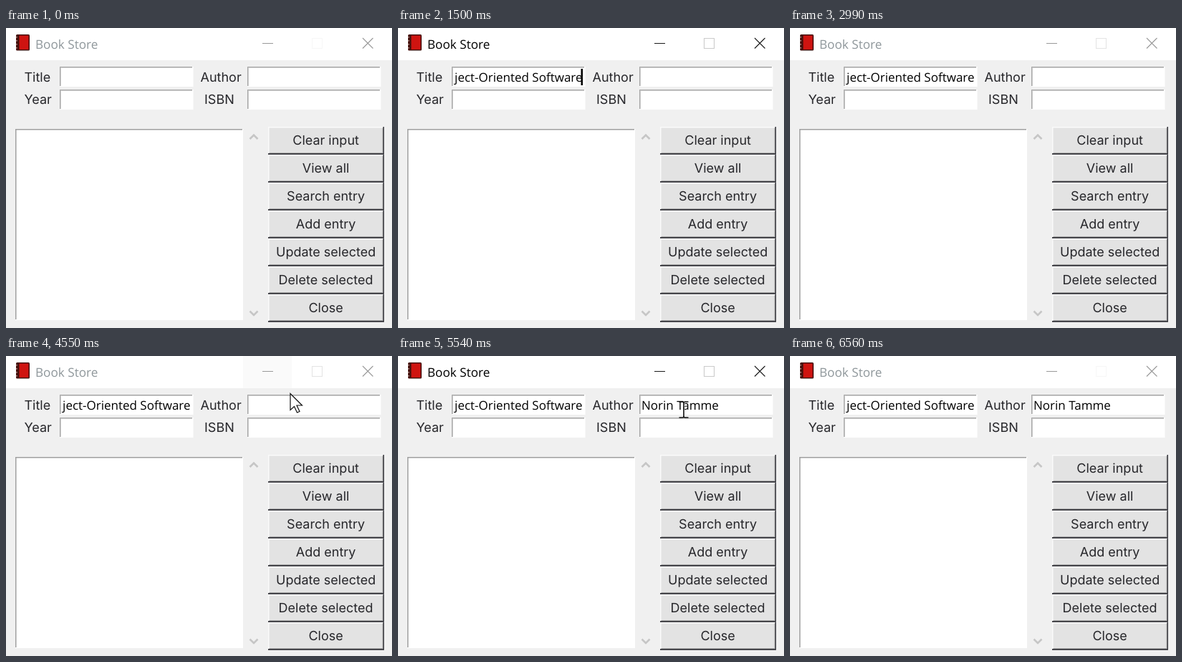
Animation of 539x419 px, one loop 8000 ms. Source, as an HTML page:

```html
<!DOCTYPE html>
<html lang="en">
<head>
<meta charset="utf-8">
<title>Book Store</title>
<style>
  html, body { margin: 0; width: 100%; height: 100%; overflow: hidden; background: #f0f0f0; }
  svg { display: block; width: 539px; height: 419px; }
  text { text-rendering: geometricPrecision; }
  .ui { font: 18px Inter, sans-serif; fill: #26262a; }
  .field { font: 17px "Open Sans", sans-serif; fill: #000; }
  .mid { text-anchor: middle; }
  .line { fill: none; stroke-width: 1.1; }

  .title, .ctl, .max, .caret, .beam1, .beam2, .arrow, .hover, .book, .author {
    animation: 8s step-end infinite;
  }
  .title { animation-name: title; font-size: 17.15px; }
  .ctl { animation-name: ctl; }
  .max { animation-name: max; }
  .caret { animation-name: caret; }
  .book { animation-name: book; }
  .author { animation-name: author; }
  .beam1 { animation-name: beam1; }
  .beam2 { animation-name: beam2; }
  .arrow, .hover { animation-name: arrow; }

  @keyframes title {
    0%, 37.375%, 75.75% { fill: #8f979b; }
    18.75%, 69.25% { fill: #000; }
  }
  @keyframes ctl {
    0%, 37.375%, 75.75% { stroke: #999; }
    18.75%, 69.25% { stroke: #1a1a1a; }
  }
  @keyframes max {
    0%, 82% { stroke: #f7f7f7; }
    18.75%, 69.25% { stroke: #cbcbcb; }
    37.375%, 75.75% { stroke: #e4e4e4; }
  }
  @keyframes book { 0% { opacity: 0; } 18.75% { opacity: 1; } }
  @keyframes caret { 0%, 37.375% { opacity: 0; } 18.75% { opacity: 1; } }
  @keyframes author { 0% { opacity: 0; } 69.25% { opacity: 1; } }
  @keyframes beam1 { 0%, 18.75% { opacity: 0; } 12.5% { opacity: 1; } }
  @keyframes beam2 { 0%, 75.75% { opacity: 0; } 63.125% { opacity: 1; } }
  @keyframes arrow { 0%, 63.125% { opacity: 0; } 56.875% { opacity: 1; } }
</style>
</head>
<body>
<svg viewBox="0 0 539 419">
  <defs>
    <g id="entry">
      <path fill="#fff" d="M0 0h186.500v28H0z"/>
      <path fill="#a6a6a6" d="M0 0h185v1H0zM0 0h1v27H0z"/>
      <path fill="#cecece" d="M1 1h184v1H1zM1 1h1v26H1z"/>
    </g>
    <g id="button">
      <path fill="#e3e3e3" d="M0 0h162v39H0z"/>
      <path fill="#fafafa" d="M0 0h161v1.500H0zM0 0h1.500v37H0z"/>
      <path fill="#aaa" d="M1.500 36h159v1h-159zM159.500 1.500h1v35h-1z"/>
      <path fill="#34343a" d="M0 37h162v1.700H0zM160.500 0h1.500v38.700h-1.500z"/>
    </g>
    <g id="beam">
      <path fill="none" stroke="#fff" stroke-width="3.500" opacity=".6" d="M0 1v22"/>
      <path fill="none" stroke="#111" stroke-width="1.600"
            d="M-6.500 1h4.500q2 0 2 2q0-2 2-2h4.500M0 2v20M-6.500 23h4.500q2 0 2-2q0 2 2 2h4.500"/>
    </g>
    <clipPath id="clip"><path d="M77.500 56h181v25h-181z"/></clipPath>
  </defs>

  <path fill="#f0f0f0" d="M0 0h539v419H0z"/>
  <path fill="#fff" d="M0 0h539v45H0z"/>
  <path class="hover" fill="#fafafa" d="M331 0h68v45h-68z"/>

  <g>
    <rect x="14" y="9" width="19" height="22.500" rx="1.500" fill="#45100c"/>
    <path fill="#cf1410" d="M18.500 10.500h13v19.500h-13z"/>
    <path fill="#a07a76" d="M14 12h2v1.500h-2zM14 17h2v1.500h-2zM14 22h2v1.500h-2zM14 27h2v1.500h-2z"/>
  </g>
  <text class="field title" x="41" y="28.500">Book Store</text>
  <path class="line ctl" d="M358 21.500h15M498 14l14.500 14.500M512.500 14l-14.500 14.500"/>
  <path class="line max" d="M427.500 14.500h14v14h-14z"/>

  <g class="ui">
    <text x="25.500" y="74.600">Title</text>
    <text x="25.500" y="106.300">Year</text>
    <text x="271.500" y="74.600">Author</text>
    <text x="277" y="106.300">ISBN</text>
  </g>
  <use href="#entry" x="75" y="54"/>
  <use href="#entry" x="75" y="86"/>
  <use href="#entry" x="337" y="54"/>
  <use href="#entry" x="337" y="86"/>

  <g clip-path="url(#clip)">
    <text class="field book" x="257.500" y="74.600" text-anchor="end">ject-Oriented Software</text>
  </g>
  <path class="caret" d="M255.500 57h2.500v23h-2.500z"/>
  <text class="field author" x="340" y="74.600">Norin Tamme</text>

  <path fill="#fff" d="M13 141h318v267H13z"/>
  <path fill="#a0a0a0" d="M13 141h317v1.500H13zM13 141h1.500v266H13z"/>
  <path fill="none" stroke="#c6c6c6" stroke-width="2.600" d="M340.500 155l5.500-5.500l5.500 5.500M340.500 395.500l5.500 5.500l5.500-5.500"/>

  <g id="buttons" class="ui mid"></g>

  <use class="beam1" href="#beam" x="133" y="63"/>
  <use class="beam2" href="#beam" x="399" y="63"/>
  <path class="arrow" transform="translate(397 52)" fill="#fff" stroke="#111" stroke-width="1.200"
        d="M0 .5v23l5.500-5l4 8.500l3.500-1.500l-4-8.500h7.500z"/>
</svg>
<script>
  const labels = ["Clear input", "View all", "Search entry", "Add entry",
    "Update selected", "Delete selected", "Close"];
  document.getElementById("buttons").innerHTML = labels.map((label, i) => {
    const y = 138 + i * 39;
    return `<use href="#button" x="366" y="${y}"/><text x="446.6" y="${y + 25}">${label}</text>`;
  }).join("");
</script>
</body>
</html>
```
